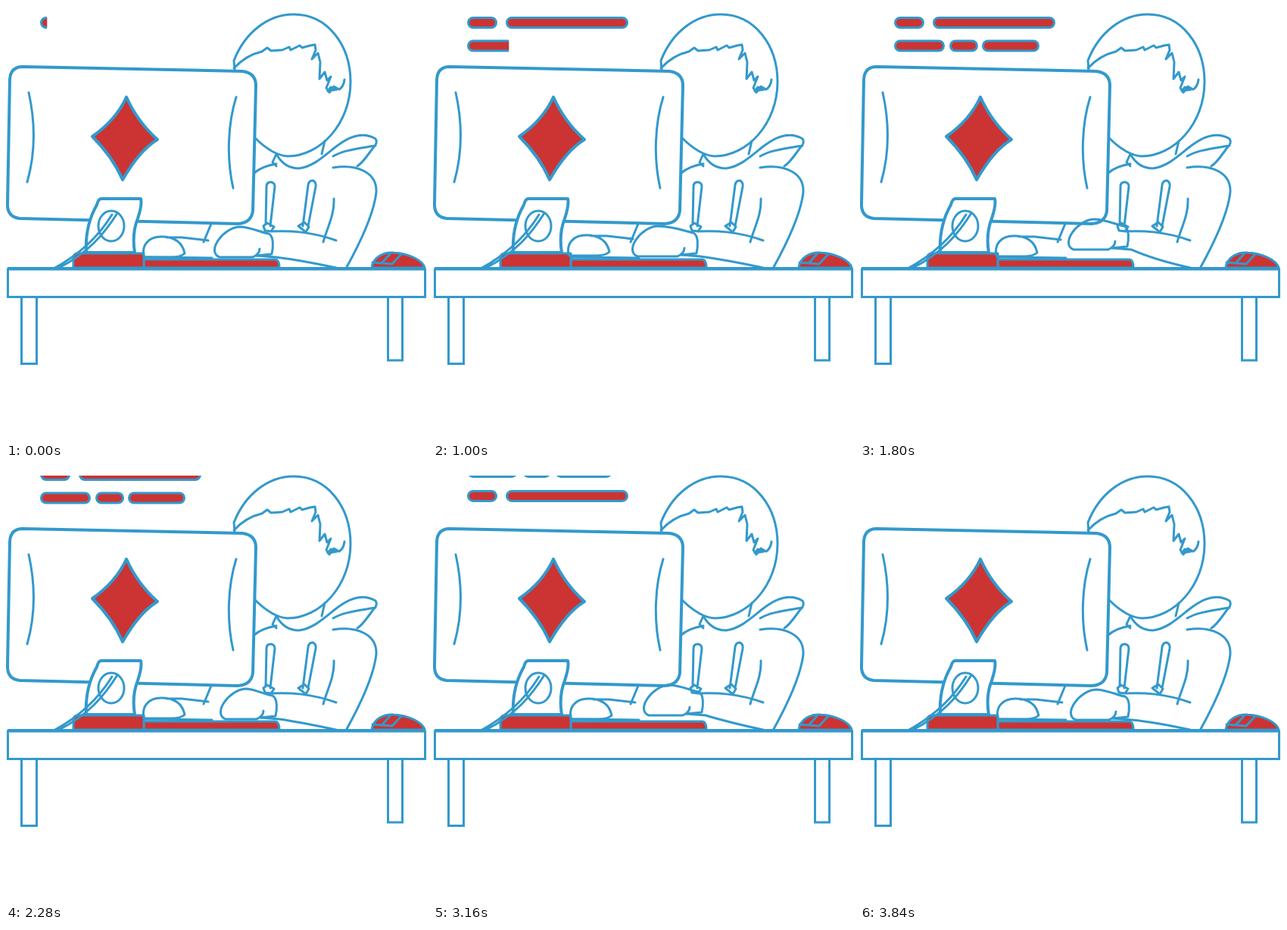
An HTML page that plays this animation: 556x572 px, repeating every 3880 ms.

```html
<!DOCTYPE html>
<html lang="en">
<head>
<meta charset="utf-8">
<title>Typing at a desk</title>
<style>
html, body { margin: 0; width: 100%; height: 100%; overflow: hidden; background: #fff; }
svg { display: block; width: 556px; height: 572px; }
.line { fill: none; stroke: #39c; stroke-width: 3; stroke-linejoin: round; stroke-linecap: round; }
.white { fill: #fff; }
.red { fill: #c33; }
.bold { stroke-width: 4; }
</style>
</head>
<body>
<svg viewBox="0 0 556 572">
  <defs><clipPath id="top"><rect x="0" y="10" width="300" height="68"/></clipPath></defs>
  <g clip-path="url(#top)"><g id="rows" class="line red"></g></g>

  <g class="line">
    <!-- head and hair -->
    <path d="M302 84L301 72C315 36 345 11 380 11C425 11 455 52 455 100C455 155 415 198 372 198C354 197 338 183 328 173"/>
    <path d="M301 82C312 70 325 63 338 60L345 55L350 59L365 58L374 54L376 58L388 52L391 55L402 52L408 51L409 58L404 70L412 62L415 74L414 96L421 87L424 98L429 93L423 108L427 114L433 106L440 110Q446 106 447 97"/>
    <path d="M425 112L429 107L437 110Z" class="red" style="fill:#39c"/>
    <!-- collar and jacket -->
    <path d="M421 178L417 195M357 195L352 206L357 211M357 195C364 208 375 214 387 214C405 212 420 198 435 186C450 174 470 164 488 175Q492 180 484 188C478 196 471 207 464 211M432 198C445 190 465 188 488 184"/>
    <path d="M328 220C336 213 345 210 357 208M432 213C465 208 490 220 489 245C486 275 466 315 450 344M433 254C434 275 425 290 419 311"/>
    <path d="M343 287L344 238Q344 232 350 232Q355 233 355 238L349 290M340 290L345 286L354 291L350 297L342 296Z"/>
    <path d="M392 290L399 236Q400 230 405 230Q410 232 409 238L399 290M386 290L394 285L400 291L396 298Z"/>
    <path d="M351 297C375 296 402 297 436 309"/>
    <path d="M271 287L261 311"/>
  </g>

  <g class="line">
    <!-- monitor -->
    <path class="white bold" d="M22 80L312 86Q330 88 330 105L326 270Q324 286 306 287L18 280Q2 278 2 262L5 97Q6 80 22 80Z"/>
    <path d="M30 114C38 150 40 190 28 232M304 120C293 155 291 200 300 240"/>
    <path class="red bold" d="M159 120C168 140 182 160 200 176C180 188 166 208 154 229C145 208 132 190 114 172C134 158 150 140 159 120Z"/>
    <!-- keyboard -->
    <path class="red" d="M182 345V334H355Q361 334 361 345Z"/>
    <path class="red" d="M89 345V332Q89 326 95 326H182V345Z"/>
    <!-- stand and cable -->
    <path class="white bold" d="M126 254H178Q180 262 174 280Q166 300 170 325H106Q104 290 120 262Q122 254 126 254Z"/>
    <ellipse cx="139" cy="290" rx="17" ry="20"/>
    <path d="M147 273C130 300 108 326 70 345M140 275C124 301 100 326 63 346"/>
  </g>

  <!-- hands -->
  <g class="line">
    <path id="left" d="M182 330C179 315 188 304 205 304C218 304 232 308 236 326C232 330 225 331 218 331H183M212 305L232 305L267 309"/>
    <path id="right"/>
    <path d="M183 331L272 332"/>
    <path id="sleeve"/>
  </g>

  <g class="line">
    <!-- mouse -->
    <path class="red" d="M483 345C485 330 500 324 512 325C530 326 550 334 553 345Z"/>
    <path d="M484 338L510 340L522 327M497 338L507 327"/>
    <!-- desk -->
    <g style="stroke-linejoin:miter">
      <path d="M20.500 384V471.500H40.500V384M504.500 384V467H523.500V384"/>
      <rect class="white" x="2.500" y="347" width="551" height="36.500"/>
      <path d="M2 346H554" style="stroke-width:4;stroke-linecap:butt"/>
    </g>
  </g>
</svg>
<script>
const LOOP = 3880;
const NS = 'http://www.w3.org/2000/svg';
const $ = id => document.getElementById(id);

function add(parent, name, attrs) {
  const el = document.createElementNS(NS, name);
  for (const k in attrs) el.setAttribute(k, attrs[k]);
  return parent.appendChild(el);
}

// Piecewise linear track of [time, value] points.
function track(points, t) {
  if (t <= points[0][0]) return points[0][1];
  for (let i = 1; i < points.length; i++) {
    const [a, x] = points[i - 1], [b, y] = points[i];
    if (t <= b) return x + (y - x) * (t - a) / (b - a);
  }
  return points[points.length - 1][1];
}

// Each row: centre height, bars as [left, right], and the typed edge over time.
const long = [[45, 85], [96, 258]];
const rows = [
  { y: 22, bars: long, type: [[0, 54], [760, 260]] },
  { y: 52.500, bars: [[45, 112], [118, 156], [161, 237]], type: [[760, 43], [1000, 100], [1600, 240]] },
  { y: 84.500, bars: long, type: [[2300, 42], [2720, 185], [2940, 260]] }
];
const scroll = [[1840, 0], [2280, 13], [2720, 27], [3160, 47.500], [3780, 86]];

rows.forEach((row, i) => {
  const clip = add($('rows'), 'clipPath', { id: 'row' + i });
  row.clip = add(clip, 'rect', { x: 30, y: row.y - 10, height: 20, rx: 4 });
  const g = add($('rows'), 'g', { 'clip-path': `url(#row${i})` });
  for (const [a, b] of row.bars)
    add(g, 'rect', { x: a + 1.5, y: row.y - 6.5, width: b - a - 3, height: 13, rx: 6.5 });
});

// Resting points of the hands: time, right hand x and y, its wrist x, left hand x and y.
const poses = [
  [0, 0, 0, 0, 0, 0],
  [1000, -12, -1, -3, -3, -2],
  [1800, 0, -10, 2, -2, -1],
  [2280, 8, 0, 5, 0, -1],
  [2720, 6, -2, 5, -3, -1],
  [3160, 3, -5, 4, 0, 0],
  [3840, 3, 1, 3, 0, 0],
  [LOOP, 0, 0, 0, 0, 0]
];

// Moves between resting points with a quick tapping swing on top.
function pose(t) {
  let i = 1;
  while (t > poses[i][0]) i++;
  const a = poses[i - 1], b = poses[i];
  const span = b[0] - a[0], u = (t - a[0]) / span;
  const swing = Math.sin(2 * Math.PI * Math.round(span / 240) * u);
  const amp = [0, -4, -2, -1, 1.5, 1];
  return a.map((v, k) => v + (b[k] - v) * u + amp[k] * swing);
}

function draw(t) {
  rows.forEach(row => row.clip.setAttribute('width', Math.max(0, track(row.type, t) - 30)));
  $('rows').setAttribute('transform', `translate(0 ${-track(scroll, t)})`);

  const [, x, y, w, lx, ly] = pose(t);
  const p = (px, py) => `${px + x} ${py + y}`;
  const q = (px, py) => `${px + w} ${py + y}`;
  $('right').setAttribute('d',
    `M${p(282, 331)}C${p(264, 324)} ${p(287, 291)} ${p(310, 291)}` +
    `C${q(325, 292)} ${q(338, 299)} ${q(347, 300)}` +
    `C${q(354, 304)} ${q(353, 318)} ${q(351, 327)}L${q(331, 329)}` +
    `M${p(282, 331)}L${q(326, 331)}Q${q(335, 327)} ${q(335, 320)}`);
  $('sleeve').setAttribute('d', `M${q(331, 329)}L${q(356, 331)}Q390 335 436 345`);
  $('left').setAttribute('transform', `translate(${lx} ${ly})`);
}

const start = performance.now();
function tick() {
  draw((performance.now() - start) % LOOP);
  requestAnimationFrame(tick);
}
draw(0);
requestAnimationFrame(tick);
</script>
</body>
</html>
```
